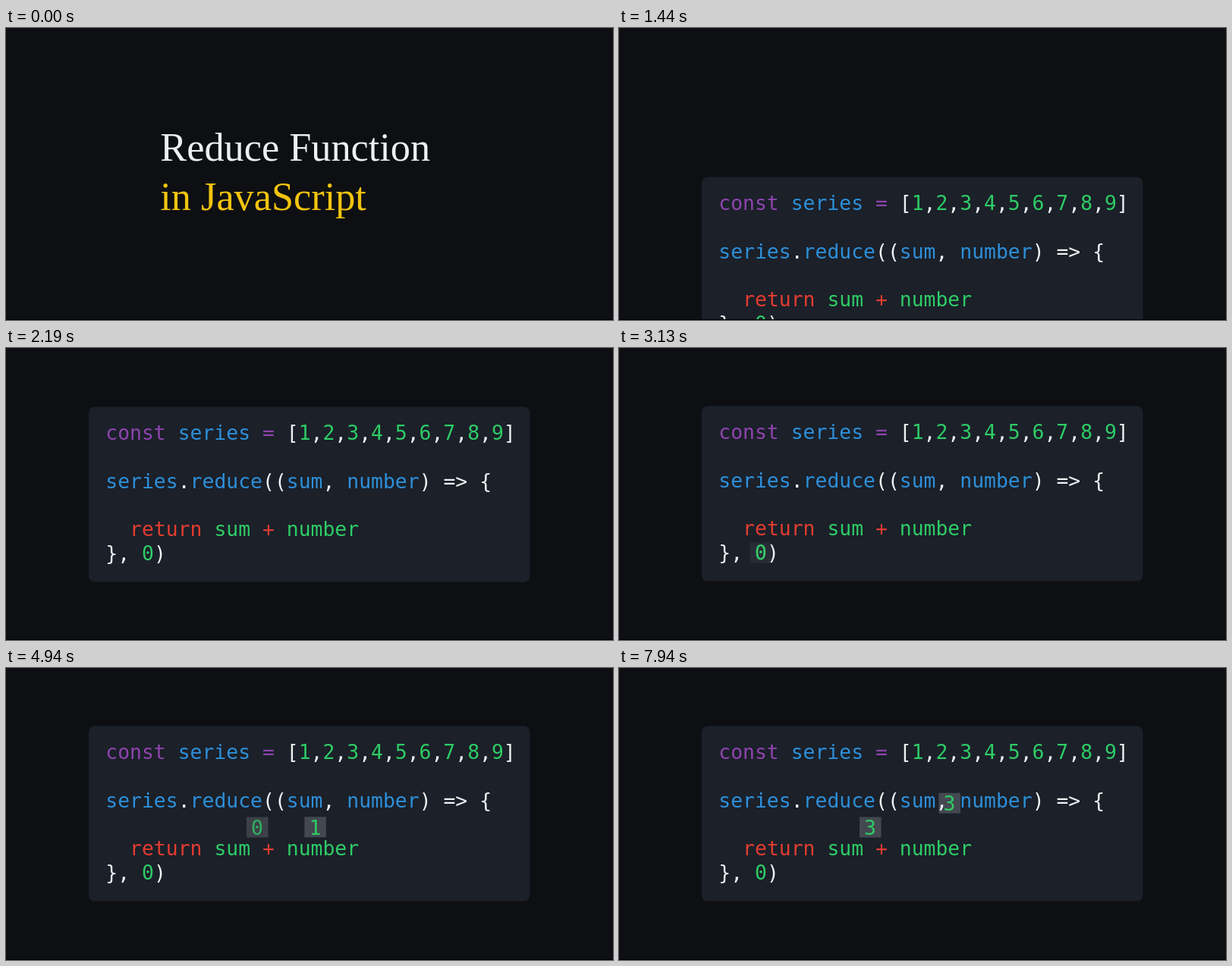
An HTML page with a canvas for the animation above (8000 ms loop, 800 by 385 pixels).

```html
<!DOCTYPE html>
<html lang="en">
<head>
<meta charset="utf-8">
<title>Reduce Function in JavaScript</title>
<style>
  html, body { margin: 0; width: 100%; height: 100%; overflow: hidden; background: #0e0f12; }
  canvas { display: block; }
</style>
</head>
<body>
<canvas id="stage" width="800" height="385"></canvas>
<script>
const ctx = document.getElementById('stage').getContext('2d');
const LOOP = 8000;
const MONO = '26.4px "DejaVu Sans Mono", monospace';
const PITCH = 15.9, LEFT = 131.3, BASE = 120, LINE = 31.85;
const WHITE = '#f0f2f3', BLUE = '#2d8fd9', GREEN = '#2ecc66', RED = '#e23c30', PURPLE = '#8e44ad';

// Each entry: line, column, text, colour
const code = [
  [0, 0, 'const', PURPLE], [0, 6, 'series', BLUE], [0, 13, '=', PURPLE],
  [0, 15, '[ , , , , , , , , ]', WHITE], [0, 16, '1 2 3 4 5 6 7 8 9', GREEN],
  [2, 0, 'series', BLUE], [2, 6, '.', WHITE], [2, 7, 'reduce', BLUE], [2, 13, '((', WHITE],
  [2, 15, 'sum', BLUE], [2, 18, ',', WHITE], [2, 20, 'number', BLUE], [2, 26, ') => {', WHITE],
  [4, 2, 'return', RED], [4, 9, 'sum', GREEN], [4, 13, '+', RED], [4, 15, 'number', GREEN],
  [5, 0, '},', WHITE], [5, 3, '0', GREEN], [5, 4, ')', WHITE]
];

const SUM = [331, 210], NUMBER = [425, 210], INITIAL = [186.5, 270];
const MOVE = 750;
const rounds = [
  { n: 1, before: 0, show: 3693, go: 4300, merge: 4890 },
  { n: 2, before: 1, show: 5832, go: 5832, merge: 6582 },
  { n: 3, before: 3, show: 7702, go: 7702, merge: 8452 }
];

const progress = (t, start, length) => Math.min(1, Math.max(0, (t - start) / length));
const easeOut = u => 1 - (1 - u) ** 3;
const between = (a, b, k) => a.map((v, i) => v + (b[i] - v) * k);
const digitHome = n => [394 + (n - 1) * 2 * PITCH, 110];

function drawTitle(t) {
  ctx.globalAlpha = 1 - progress(t, 40, 1000);
  ctx.font = '52.3px "Liberation Serif", "Times New Roman", serif';
  ctx.fontKerning = 'none';
  ctx.textAlign = 'left';
  ctx.fillStyle = '#ecf0f1';
  ctx.fillText('Reduce Function', 203.3, 175);
  ctx.fillStyle = '#f1c40f';
  ctx.fillText('in JavaScript', 203.3, 239.5);
  ctx.globalAlpha = 1;
}

function drawCode(t) {
  const shift = 385 * 2 ** (-(t - 1260) / 107);
  ctx.save();
  ctx.translate(0, shift);
  ctx.fillStyle = '#1b2029';
  ctx.beginPath();
  ctx.roundRect(109, 76.5, 581.5, 231, 8);
  ctx.fill();
  ctx.font = MONO;
  ctx.textAlign = 'left';
  for (const [line, col, text, color] of code) {
    ctx.fillStyle = color;
    ctx.fillText(text, LEFT + col * PITCH, BASE + line * LINE);
  }
  ctx.restore();
}

function drawChip(label, [x, y], alpha = 1) {
  ctx.globalAlpha = alpha;
  ctx.fillStyle = 'rgba(255,255,255,.18)';
  ctx.fillRect(x - 14, y - 13.5, 28.5, 27);
  ctx.font = MONO;
  ctx.textAlign = 'center';
  ctx.fillStyle = GREEN;
  ctx.fillText(label, x, y + 10);
  ctx.globalAlpha = 1;
}

function drawChips(t) {
  if (t < 2890) return;
  const round = rounds.findLast(r => t >= r.show);
  if (!round) return drawChip(0, INITIAL, progress(t, 2890, 800));

  const { n, before, show, go, merge } = round;
  const joined = easeOut(progress(t, merge, MOVE));
  const sumAt = n === 1 ? between(INITIAL, SUM, easeOut(progress(t, show, MOVE))) : SUM;
  if (joined < 1) drawChip(before, sumAt, 1 - joined);

  const arrived = between(digitHome(n), NUMBER, easeOut(progress(t, go, MOVE)));
  const fade = go > show ? progress(t, show, go - show) : 1;
  drawChip(joined > .99 ? before + n : n, between(arrived, SUM, joined), fade);
}

function draw(now) {
  const t = now % LOOP;
  ctx.fillStyle = '#0e0f12';
  ctx.fillRect(0, 0, 800, 385);
  if (t < 1060) drawTitle(t);
  if (t >= 1260) drawCode(t);
  drawChips(t);
  ctx.fillStyle = '#000';
  ctx.fillRect(0, 384, 800, 1);
}

let start;
function frame(now) {
  start ??= now;
  draw(now - start);
  requestAnimationFrame(frame);
}
draw(0);
requestAnimationFrame(frame);
</script>
</body>
</html>
```
